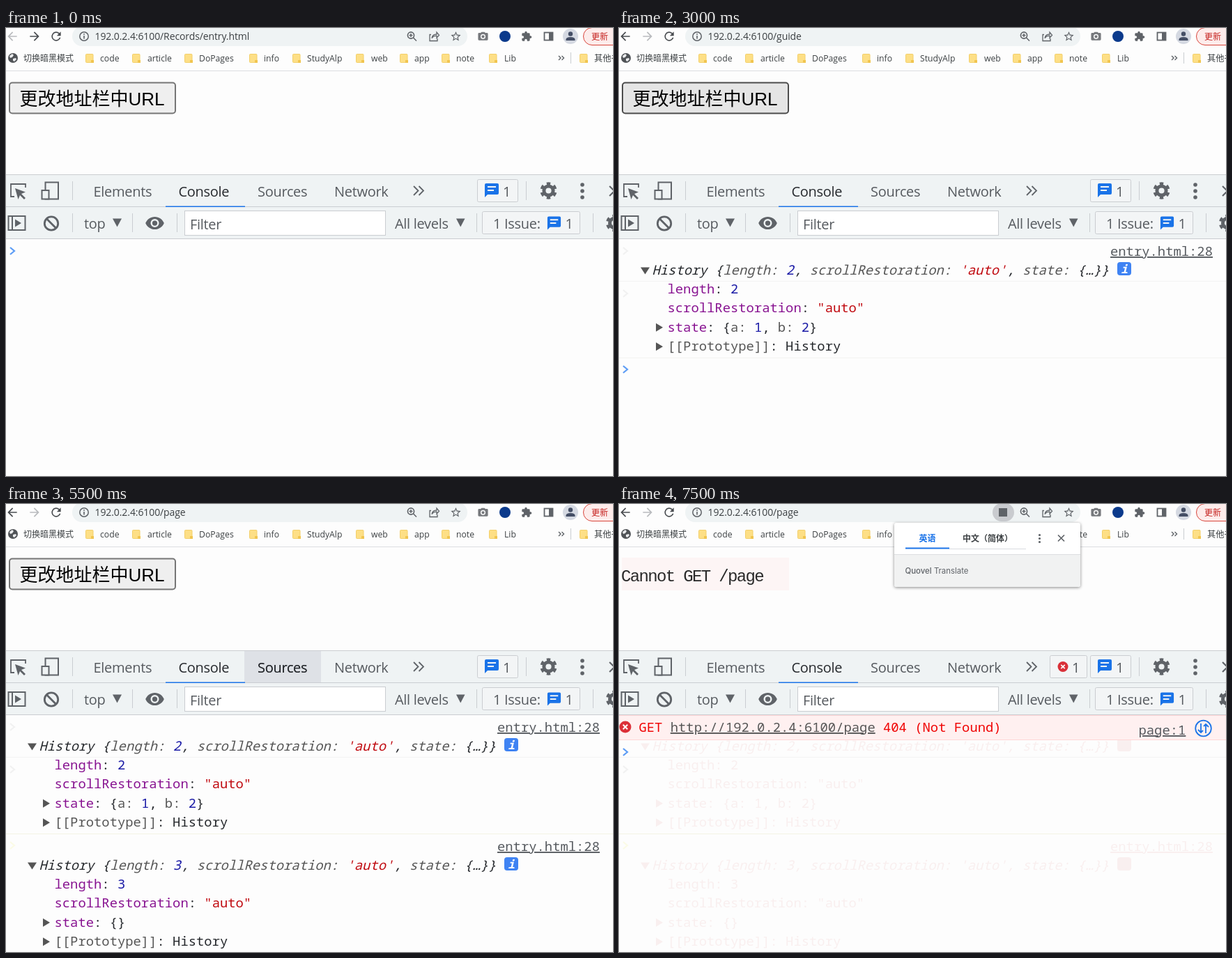
An HTML page that plays this animation: 871x643 px, repeating every 8 s.

```html
<!DOCTYPE html>
<html lang="zh">
<head>
<meta charset="utf-8">
<style>
html, body { margin: 0; width: 100%; height: 100%; overflow: hidden; background: #fdfdfd; }
svg { display: block; }
text { white-space: pre; fill: #565a5f; }
.ui { font: 20px 'Open Sans', 'Noto Sans', sans-serif; letter-spacing: -.3px; }
.mark { font: 12.2px 'Open Sans', 'Noto Sans CJK SC', sans-serif; fill: #3c4043; }
.cjk { font: 12px 'Noto Sans CJK SC', sans-serif; fill: #3c4043; }
.url { font: 14px 'Open Sans', 'Noto Sans', sans-serif; letter-spacing: -.1px; fill: #3c4043; }
.btn { font: 26px 'Liberation Sans', 'Noto Sans CJK SC', sans-serif; fill: #000; }
.mono { font: 18.85px 'Noto Sans Mono', 'DejaVu Sans Mono', monospace; }
.page { font: 24px 'Liberation Mono', monospace; letter-spacing: -1.65px; fill: #2a2a2a; }
.brand { font: 11.4px 'Inter', sans-serif; fill: #5f6368; }
.it { font-style: italic; }
.b { font-weight: bold; }
.u { text-decoration: underline; }
.dark { fill: #26292d; }
.key { fill: #881391; }
.num { fill: #1a1aa6; }
.str { fill: #c00a10; }
.dim { fill: #565656; }
.red { fill: #f00505; }
.blue { fill: #1a73e8; }
.ghost * { fill: #f9efef !important; }
</style>
</head>
<body>
<svg id="stage" width="871" height="643" viewBox="0 0 871 643"></svg>
<script>
const LOOP = 8000, GREY = '#5f6368', LINE = '#cacdd1', BLUE = '#1a73e8', BAR = '#eff3f4';
const HOST = '192.0.2.4:6100';

const text = (x, y, s, cls) => `<text x="${x}" y="${y}" class="${cls}">${s}</text>`;
const rect = (x, y, w, h, fill, more = '') =>
  `<rect x="${x}" y="${y}" width="${w}" height="${h}" fill="${fill}" ${more}/>`;
const circle = (x, y, r, fill, more = '') => `<circle cx="${x}" cy="${y}" r="${r}" fill="${fill}" ${more}/>`;
const fillPath = (d, fill = GREY) => `<path d="${d}" fill="${fill}"/>`;
const stroke = (d, color = GREY, w = 2) => `<path d="${d}" fill="none" stroke="${color}" stroke-width="${w}"/>`;
const icon = (d, cx, cy, size, fill = GREY, id = '') =>
  `<path ${id && `id="${id}"`} d="${d}" fill="${fill}" fill-rule="evenodd" transform="translate(${cx - size / 2} ${cy - size / 2}) scale(${size / 24})"/>`;
const during = (from, to, s) => `<g data-from="${from}" data-to="${to}">${s}</g>`;
// "class~text" pieces become coloured spans
const rich = (...parts) => parts.map(p => {
  const [cls, s] = p.split('~');
  return `<tspan class="${cls}">${s}</tspan>`;
}).join('');

const PATHS = {
  back: 'M20 11H7.83l5.59-5.59L12 4l-8 8 8 8 1.41-1.41L7.83 13H20z',
  forward: 'M12 4l-1.41 1.41L16.17 11H4v2h12.17l-5.58 5.59L12 20l8-8z',
  reload: 'M17.65 6.35A8 8 0 1 0 19.73 14h-2.08A6 6 0 1 1 16.22 7.78L13 11h7V4z',
  star: 'M22 9.24l-7.19-.62L12 2 9.19 8.63 2 9.24l5.46 4.73L5.82 21 12 17.27 18.18 21l-1.63-7.03zM12 15.4l-3.76 2.27 1-4.28-3.32-2.88 4.38-.38L12 6.1l1.71 4.04 4.38.38-3.32 2.88 1 4.28z',
  camera: 'M9 3L7.2 5H4a2 2 0 0 0-2 2v11a2 2 0 0 0 2 2h16a2 2 0 0 0 2-2V7a2 2 0 0 0-2-2h-3.2L15 3zM12 7.5a5 5 0 1 1 0 10a5 5 0 1 1 0-10zM12 9.5a3 3 0 1 0 0 6a3 3 0 1 0 0-6z',
  puzzle: 'M20.5 11H19V7a2 2 0 0 0-2-2h-4V3.5a2.5 2.5 0 0 0-5 0V5H4a2 2 0 0 0-2 2v3.8h1.5a2.7 2.7 0 0 1 0 5.4H2V20a2 2 0 0 0 2 2h3.8v-1.5a2.7 2.7 0 0 1 5.4 0V22H17a2 2 0 0 0 2-2v-4h1.5a2.5 2.5 0 0 0 0-5z',
  eye: 'M12 4.5C7 4.5 2.73 7.61 1 12c1.73 4.39 6 7.5 11 7.5s9.27-3.11 11-7.5c-1.73-4.39-6-7.5-11-7.5zM12 17a5 5 0 1 1 0-10a5 5 0 1 1 0 10zM12 9a3 3 0 1 0 0 6a3 3 0 1 0 0-6z',
  message: 'M20 2H4a2 2 0 0 0-2 2v18l4-4h14a2 2 0 0 0 2-2V4a2 2 0 0 0-2-2zM6 6h12v2H6zM6 11h9v2H6z'
};

const cross = (x, y, r, color, w) =>
  stroke(`M${x - r} ${y - r}l${2 * r} ${2 * r}m0 ${-2 * r}l${-2 * r} ${2 * r}`, color, w);
const gear = (x, y) =>
  circle(x, y, 6.6, 'none', `stroke="${GREY}" stroke-width="5"`) +
  circle(x, y, 10, 'none', `stroke="${GREY}" stroke-width="4.4" pathLength="12" stroke-dasharray="1" stroke-dashoffset="-.5"`);
const dots = (x, y, gap, r) => [-gap, 0, gap].map(d => circle(x, y + d, r, GREY)).join('');
const badge = (x, y, w) => rect(x + .5, y + .5, w, 32, '#f3f5f6', `rx="2" stroke="${LINE}"`);
const bars = (y, ...xs) => xs.map(x => rect(x, y, 1, 27, LINE)).join('');
const person = circle(810, 12, 11, '#d5d9e2') + circle(810, 8.5, 3.2, '#454f66') +
  fillPath('M803.5 18v-1.5q0-3.5 6.5-3.5t6.5 3.5v1.5z', '#454f66');

function browser() {
  const folders = [[114, 135, 'code'], [181, 203, 'article'], [256, 277, 'DoPages'], [349, 370, 'info'],
    [411, 432, 'StudyAlp'], [502, 524, 'web'], [565, 586, 'app'], [625, 646, 'note'], [693, 715, 'Lib'],
    [823, 844, '其他书签']];
  return icon(PATHS.back, 9, 12, 20, GREY, 'back') + icon(PATHS.forward, 41, 12, 20, GREY, 'forward') +
    icon(PATHS.reload, 72, 12, 20, '#4a4d51') +
    rect(95, -2, 567, 28, BAR, 'id="pill" rx="14"') +
    during(6200, 7300, rect(94, -2, 569, 27, 'none', `rx="13.5" stroke="${BLUE}" stroke-width="2"`)) +
    during(6300, 7300, rect(127, 2, 134, 20, '#98c5f8')) +
    circle(112, 12, 6.2, 'none', `stroke="${GREY}" stroke-width="1.5"`) +
    rect(111.2, 11, 1.6, 4.5, GREY) + rect(111.2, 8, 1.6, 1.7, GREY) +
    '<text id="url" class="url" x="127.5" y="17"></text>' +
    during(7500, LOOP, rect(536, -1, 31, 26, '#c9cbcf', 'rx="13"') + rect(545, 6, 12, 12, GREY)) +
    circle(581, 10.5, 4.6, 'none', `stroke="${GREY}" stroke-width="1.6"`) +
    stroke('M584.5 14l4.5 4.5M578.5 10.5h5M581 8v5', GREY, 1.5) +
    stroke('M610 9.5h-2v9h11v-3.5M611 14.5q1-5.5 7-5.5v-3l3.5 4.2-3.5 4v-3q-4.5 0-7 3.3z', GREY, 1.3) +
    icon(PATHS.star, 645.5, 12, 17) + icon(PATHS.camera, 684.5, 12, 17, '#77797d') +
    circle(716, 12, 8, '#0b3a8c') + icon(PATHS.puzzle, 747, 12, 16) +
    rect(772.5, 6.5, 12, 11, 'none', `stroke="${GREY}" stroke-width="1.8"`) + rect(779, 6, 6, 12, GREY) +
    person + rect(828.5, -.5, 60, 25, '#fdeceb', 'rx="12.5" stroke="#d9453b"') +
    '<text x="840" y="16.5" class="cjk" style="fill:#c5221f">更新</text>' +
    circle(10, 43, 7, '#505357') +
    fillPath('M5 40l4-3 2 2-2 3-3 1zM10 44l4-1 1 2-3 3-2-1z', '#e9eaec') +
    text(25, 48, '切换暗黑模式', 'cjk') +
    folders.map(([x, tx, name]) => rect(x + .5, 37.5, 10.5, 12, '#fddf86', 'rx="1" stroke="#f3cf69"') +
      rect(x + 8, 46, 4, 4, '#f1c550') + text(tx, 48, name, 'mark')).join('') +
    stroke('M793 40l3 3-3 3m4.5-6l3 3-3 3', GREY, 1.4) + rect(810, 35, 1, 16, LINE) +
    rect(0, 61, 871, 1, '#dcdee1');
}

function page() {
  return during(0, 7300, rect(5, 78.5, 238, 44, '#efefef', 'id="button" rx="4" stroke="#767676" stroke-width="2"') +
      text(19.5, 110.5, '更改地址栏中URL', 'btn')) +
    during(7300, LOOP, rect(4, 77, 240, 47, '#fdf5f5') + text(3, 111, 'Cannot GET /page', 'page'));
}

function devtools() {
  const tab = (x, name, cls = '') => text(x, 242, name, 'ui ' + cls);
  return rect(0, 210, 871, 93, BAR) + [210, 256, 302].map(y => rect(0, y, 871, 1, LINE)).join('') +
    during(3800, 3900, rect(229, 211, 113, 45, '#dee1e6')) +
    during(5500, 5600, rect(342, 211, 110, 45, '#dee1e6')) +
    rect(229, 255.5, 114, 1.5, BLUE) +
    stroke('M28 229v-5H7v18h5', GREY, 1.8) + fillPath('M13 230l15 5.5-6 2.5 6 6-2 2-6-6-2.5 6z') +
    rect(56.5, 221.5, 18.5, 24, 'none', `stroke="${GREY}" stroke-width="2"`) +
    rect(51.5, 233, 10, 12.5, BAR, `stroke="${GREY}" stroke-width="2"`) +
    bars(220, 95, 746) +
    tab(125.5, 'Elements') + tab(247.5, 'Console', 'dark') + tab(361, 'Sources') +
    during(5500, 5600, tab(361, 'Sources', 'dark')) + tab(471, 'Network') +
    stroke('M585 227l6.5 6.5-6.5 6.5m7.5-13l6.5 6.5-6.5 6.5', GREY, 1.8) +
    during(7300, LOOP, badge(618, 217, 53) + circle(637, 233.5, 7.5, '#d93038') +
      cross(637, 233.5, 2.7, '#fff', 1.7) + text(650, 242, '1', 'ui')) +
    badge(676, 217, 58) + icon(PATHS.message, 697, 233, 24, BLUE) + text(713, 242, '1', 'ui') +
    gear(778.5, 233.5) + dots(827, 234, 9, 2.8) + cross(873, 234, 7, GREY, 2.2) +
    rect(3.5, 270, 24, 20, 'none', `stroke="${GREY}" stroke-width="2"`) + rect(8, 270, 2, 20, GREY) +
    fillPath('M13 274.5v11l9-5.5z') +
    circle(65, 280.5, 9.7, 'none', `stroke="${GREY}" stroke-width="2.8"`) + stroke('M58 273.5l14 14', GREY, 2.8) +
    bars(266, 95, 181, 245, 675, 842) +
    text(112, 288, 'top', 'ui') + fillPath('M153 273.5h13l-6.5 12z') +
    icon(PATHS.eye, 213.5, 280, 29) +
    rect(256.5, 262.5, 288, 35, '#fff', `stroke="${LINE}"`) + text(264, 289, 'Filter', 'ui') +
    text(558, 288, 'All levels', 'ui') + fillPath('M646 273.5h12.5l-6.25 12z') +
    badge(683, 263, 140) + text(699, 288, '1 Issue:', 'ui') + icon(PATHS.message, 786.5, 280, 23, BLUE) +
    text(802.5, 288, '1', 'ui') + gear(873, 280);
}

const right = (x, y) => fillPath(`M${x} ${y - 6}v12l10-6z`, '#555');
const down = (x, y) => fillPath(`M${x} ${y - 4.5}h13l-6.5 10z`, '#555');

// One console entry: shown at `from`, unfolded at `open`
function entry(top, from, open, length, state) {
  const row = i => top + 78 + i * 27.4;
  const line = (i, ...parts) => text(69.5, row(i), rich(...parts), 'mono');
  return during(from, LOOP,
    text(705, top + 24, 'entry.html:28', 'mono u') +
    text(47.5, top + 51, rich('dark~History {', 'dim~length: ', `num~${length}`, 'dark~, ', 'dim~scrollRestoration: ',
      "str~'auto'", 'dark~, ', 'dim~state: ', 'dark~{…}}'), 'mono it') +
    during(from, open, right(33, top + 45)) +
    during(open, LOOP, down(31, top + 45) + rect(715, top + 33, 20, 19, '#3f83f3', 'rx="4"') +
      `<text x="720" y="${top + 49}" class="mono it b" style="fill:#fff;font-size:17px">i</text>` +
      line(0, 'key~length', 'dark~: ', `num~${length}`) +
      line(1, 'key~scrollRestoration', 'dark~: ', 'str~"auto"') +
      right(53, row(2) - 6) + line(2, 'key~state', 'dark~: ', ...state) +
      right(53, row(3) - 6) + line(3, 'dim~[[Prototype]]', 'dark~: ', 'dark~History')));
}

const chevron = (x, y, color) => stroke(`M${x} ${y - 5}l6 5-6 5`, color, 2.2);

function consolePanel() {
  return during(700, LOOP, chevron(6, 320, '#f1f1f1') + rect(0, 363, 871, 1, '#f4f4f4')) +
    during(1700, LOOP, chevron(6, 381, '#f1f1f1') + rect(0, 473, 871, 1, '#f4f4f2')) +
    during(3400, LOOP, chevron(6, 490, '#fbfbe6') + rect(0, 473, 871, 1, '#f4f4e4')) +
    during(3400, 4800, rect(0, 534, 871, 1, '#f0f0f0')) +
    '<g id="logs">' +
    entry(303, 700, 1700, 2, ['dark~{', 'dim~a: ', 'num~1', 'dark~, ', 'dim~b: ', 'num~2', 'dark~}']) +
    entry(474, 3400, 4800, 3, ['dark~{}']) + '</g>' +
    during(7300, LOOP, rect(0, 303, 871, 36, '#fff0f0') + rect(0, 303, 871, 1, '#ffd7d7') + rect(0, 338, 871, 1, '#ffd7d7') +
      circle(9, 320, 8.5, '#dc3038') + cross(9, 320, 3.2, '#fff', 2) +
      text(28.5, 327, rich('red~GET ', `dim u~http://${HOST}/page`, 'red~ 404 (Not Found)'), 'mono') +
      text(745.5, 331, 'page:1', 'mono u') +
      circle(838.5, 322, 11.3, 'none', `stroke="${BLUE}" stroke-width="1.8"`) +
      stroke('M835 315v13m-4-4l4 4 3-3M842 329v-13m4 4l-4-4-3 3', BLUE, 1.8)) +
    '<g id="prompt">' + chevron(6, 0, '#5c9cf5') + '</g>';
}

function popup() {
  return during(7500, LOOP, '<g style="filter:drop-shadow(0 1px 2px #0007)">' + rect(395, 27, 267, 92, '#fff', 'rx="3"') + '</g>' +
    rect(395, 72, 267, 47, '#f1f2f2', 'rx="3"') + rect(395, 72, 267, 1, '#dcdee0') +
    text(430.5, 53.5, '英语', 'cjk b blue') + text(493, 53.5, '中文（简体）', 'cjk b') +
    rect(474, 64, 110, 1, '#dadce0') + rect(411, 62.5, 63, 2, BLUE) +
    dots(603.5, 49.5, 5, 1.6) + cross(634.5, 49, 4.5, GREY, 1.7) +
    text(410.5, 100, '<tspan font-weight="500">Quovel</tspan> Translate', 'brand'));
}

const $ = id => document.getElementById(id);
$('stage').innerHTML = rect(0, 0, 871, 643, '#fdfdfd') + browser() + page() + consolePanel() + devtools() + popup();
const timed = [...document.querySelectorAll('[data-from]')];

// Value of the last [start, value] step already reached
const at = (t, steps) => steps.filter(s => s[0] <= t).pop()[1];

function draw(now) {
  const t = now % LOOP;
  for (const g of timed) g.style.display = t >= +g.dataset.from && t < +g.dataset.to ? '' : 'none';
  $('url').textContent = HOST + at(t, [[0, '/Records/entry.html'], [700, '/guide'], [3400, '/page']]);
  $('back').setAttribute('fill', t < 700 ? '#b9bbbe' : '#4a4d51');
  $('forward').setAttribute('fill', t < 700 ? '#4a4d51' : '#b9bbbe');
  $('pill').setAttribute('fill', at(t, [[0, BAR], [5900, '#e9ecee'], [6200, '#fdfdfd'], [7300, BAR]]));
  const fill = at(t, [[0, '#efefef'], [200, '#e9e9e9'], [300, '#e5e5e5'], [900, '#efefef'], [3000, '#e5e5e5'], [3700, '#efefef']]);
  $('button').setAttribute('fill', fill);
  $('button').setAttribute('stroke', fill === '#e5e5e5' ? '#4c4c4c' : '#767676');
  $('logs').classList.toggle('ghost', t >= 7300);
  const y = at(t, [[0, 320], [700, 381], [1700, 490], [3400, 552], [4800, 661], [7300, 356]]);
  $('prompt').setAttribute('transform', `translate(0 ${y})`);
}

const start = performance.now();
function tick() {
  draw(performance.now() - start);
  requestAnimationFrame(tick);
}
tick();
</script>
</body>
</html>
```
